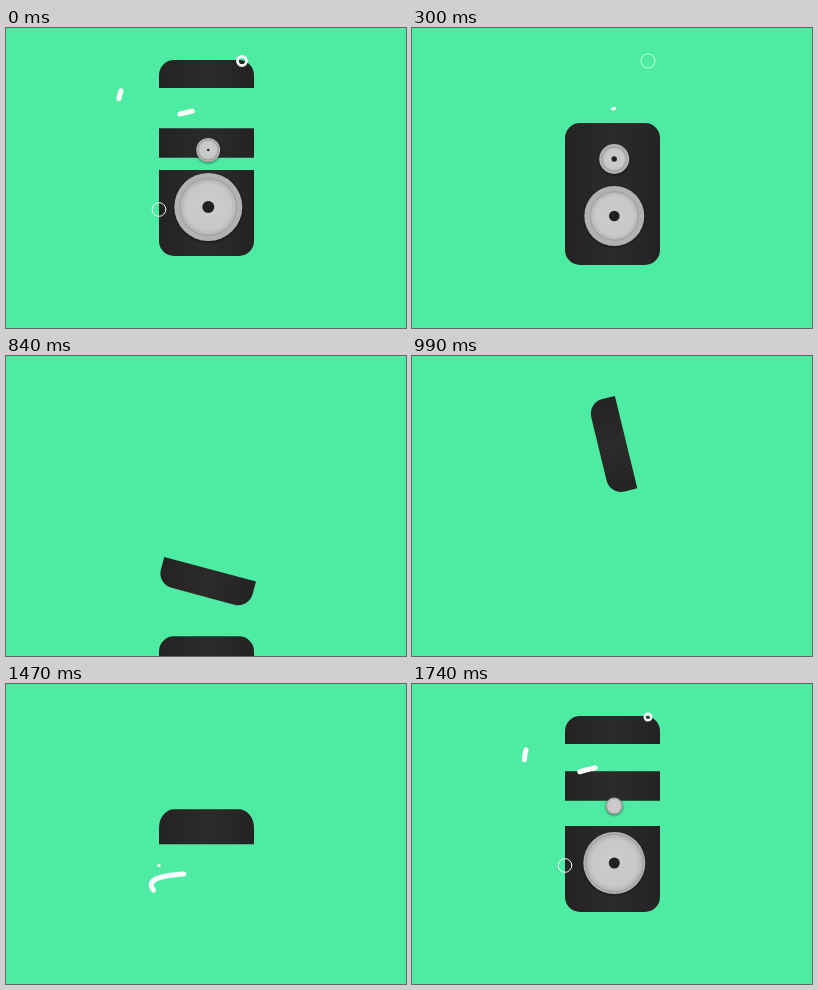
Animation, 400 px wide and 300 px high, one loop 1770 ms. Source, as an HTML page with a canvas:

```html
<!DOCTYPE html>
<html>
<head>
<meta charset="utf-8">
<style>
html, body { margin: 0; height: 100%; overflow: hidden; background: #4eeca2; }
canvas { display: block; width: 400px; height: 300px; }
</style>
</head>
<body>
<canvas id="stage" width="400" height="300"></canvas>
<script>
const ctx = document.getElementById('stage').getContext('2d');
const LOOP = 1770, STEP = 30, G = 0.0043;
const LEFT = 153, WIDTH = 95, CENTER = 200.5, FLOOR = 228, CAP = 28;

// Piecewise linear value through [time, value] pairs.
function key(t, ...pairs) {
  if (t <= pairs[0][0]) return pairs[0][1];
  for (let i = 1; i < pairs.length; i++) {
    const [a, x] = pairs[i - 1], [b, y] = pairs[i];
    if (t <= b) return x + (y - x) * (t - a) / (b - a);
  }
  return pairs[pairs.length - 1][1];
}

function makePath(d) {
  const path = document.createElementNS('http://www.w3.org/2000/svg', 'path');
  path.setAttribute('d', d);
  return path;
}
const swirl = makePath('M147.5 206C140 196 152 192 177 190S258 182 260 160S222 138 185 134' +
  'S123 118 126 104S150 93 167 88S192 82 203 80.5');
const flick = makePath('M120 108C112 90 111 76 114 66S117 58 119 55');
const swirlLen = swirl.getTotalLength(), flickLen = flick.getTotalLength();

function trim(path, from, to, width) {
  if (to - from < 0.3) return;
  ctx.beginPath();
  for (let i = 0; i <= 60; i++) {
    const p = path.getPointAtLength(from + (to - from) * i / 60);
    ctx.lineTo(p.x, p.y);
  }
  ctx.lineCap = ctx.lineJoin = 'round';
  ctx.lineWidth = width;
  ctx.strokeStyle = '#fff';
  ctx.stroke();
}

function block(x, y, h, radii) {
  const fill = ctx.createLinearGradient(x, 0, x + WIDTH, 0);
  fill.addColorStop(0, '#242223');
  fill.addColorStop(0.5, '#2c2a2a');
  fill.addColorStop(1, '#242222');
  ctx.fillStyle = fill;
  ctx.beginPath();
  ctx.roundRect(x, y, WIDTH, h, radii);
  ctx.fill();
}

function disc(x, y, r, fill) {
  ctx.fillStyle = fill;
  ctx.beginPath();
  ctx.arc(x, y, r, 0, 7);
  ctx.fill();
}

function cone(x, y, r, ratio, hole) {
  if (r <= 0) return;
  ctx.save();
  ctx.shadowColor = 'rgba(0,0,0,.5)';
  ctx.shadowBlur = 3;
  ctx.shadowOffsetY = 1;
  disc(x, y, r, '#b2b2b3');
  ctx.restore();
  const inner = r * ratio;
  const shade = ctx.createRadialGradient(x, y, 0, x, y, inner);
  shade.addColorStop(0, '#cbccce');
  shade.addColorStop(0.8, '#c7c8ca');
  shade.addColorStop(1, '#b0b1b2');
  disc(x, y, inner, shade);
  ctx.lineWidth = 0.6;
  ctx.strokeStyle = 'rgba(110,110,110,.5)';
  ctx.stroke();
  if (hole > 0) disc(x, y, hole, '#231f20');
}

function ring(x, y, age) {
  const width = key(age, [0, 0], [30, 1.5], [120, 2.8], [300, 1], [440, 0.6], [480, 0]);
  if (width <= 0) return;
  ctx.beginPath();
  ctx.arc(x, y, key(age, [0, 0], [30, 0.9], [120, 4.5], [300, 6.8], [420, 7]), 0, 7);
  ctx.lineWidth = width;
  ctx.strokeStyle = '#fff';
  ctx.stroke();
}

// The cap tumbles up and down, lands, crouches and leaps.
function looseCap(t) {
  const angle = Math.min(360, 195 + (t - 840) * 0.409) * Math.PI / 180;
  const stretch = key(t, [1240, 1], [1370, 0.75], [1422, 1], [1470, 1.25], [1620, 1]);
  let y;
  if (t < 1422) {
    const reach = 47.5 * Math.abs(Math.sin(angle)) + 14 * Math.abs(Math.cos(angle));
    const flight = t < 1250 ? 85 + 0.00425 * (t - 1022.6) ** 2 : FLOOR;
    y = t < 1022 ? flight : Math.min(flight, FLOOR - reach * stretch);
  } else {
    y = 46 + G * Math.min(0, t - 1620) ** 2;
  }
  ctx.save();
  ctx.translate(CENTER, y);
  ctx.rotate(angle);
  ctx.scale(1, stretch);
  block(-WIDTH / 2, -CAP / 2, CAP, [15, 15, 0, 0]);
  ctx.restore();
}

function sink(u) {
  if (u < 1937) return 0;
  if (u < 2310) return 14 * (1 - Math.exp((1937 - u) / 129));
  return 13.4 + 0.00201 * (u - 2310) ** 2;
}

function speaker(u) {
  if (u < 1500) return;
  const dy = sink(u);
  if (u > 1587) {
    const drop = 82 + G * (u - 1705) ** 2;
    block(LEFT, (u > 1705 ? Math.min(113, drop) : drop) + dy, 29.5, 0);
  }
  const grow = 1 - (1 - key(u, [1500, 0], [1585, 1])) ** 2;
  if (grow > 0) block(LEFT, FLOOR - 86 * grow + dy, 86 * grow, [0, 0, 15 * grow, 15 * grow]);
  if (u >= LOOP) {
    const top = Math.min(86, 32 + G * Math.max(0, u - 1825) ** 2);
    block(LEFT, top + dy, CAP, [15, 15, 0, 0]);
  }
  const big = key(u, [1620, 0], [1740, 31], [1770, 34], [1795, 35], [1900, 28.5], [1990, 30]);
  const ratio = key(u, [1740, 0.93], [1770, 0.84], [1850, 0.81]);
  cone(202.3, 179 + dy, big, ratio, big * 0.177);
  const small = key(u, [1690, 0], [1740, 8.5], [1770, 12], [1830, 17], [1950, 15]);
  cone(202.2, 122 + dy, small, ratio, key(u, [1750, 0], [1770, 1.2], [1860, 2.7]));
}

function strokes(u) {
  const L = swirlLen, F = flickLen;
  const head = key(u, [1410, 0], [1470, 42], [1620, L * 0.72], [1740, L - 20.2],
    [1770, L - 17], [2070, L - 0.5], [2130, L]);
  const tail = key(u, [1470, 0], [1650, L * 0.4], [1740, L - 36], [1770, L - 29.5],
    [2070, L - 2.5], [2130, L]);
  trim(swirl, tail, head, key(u, [1770, 5], [2070, 3]));
  trim(flick, key(u, [1650, 0], [1740, F - 22], [1770, F - 17], [1980, F]),
    key(u, [1590, 0], [1740, F - 12], [1770, F - 9], [1980, F]),
    key(u, [1770, 5], [1980, 3]));
}

function draw(now) {
  const t = Math.floor(now % LOOP / STEP) * STEP;
  const u = t < 900 ? t + LOOP : t; // one cycle, counted from the empty floor
  ctx.fillStyle = '#4eeca2';
  ctx.fillRect(0, 0, 400, 300);
  if (t >= 780) looseCap(t);
  speaker(u);
  strokes(u);
  ring(153, 181.5, u - 1440);
  ring(236, 33, u - 1650);
}

function loop() {
  draw(performance.now());
  requestAnimationFrame(loop);
}
loop();
</script>
</body>
</html>
```
